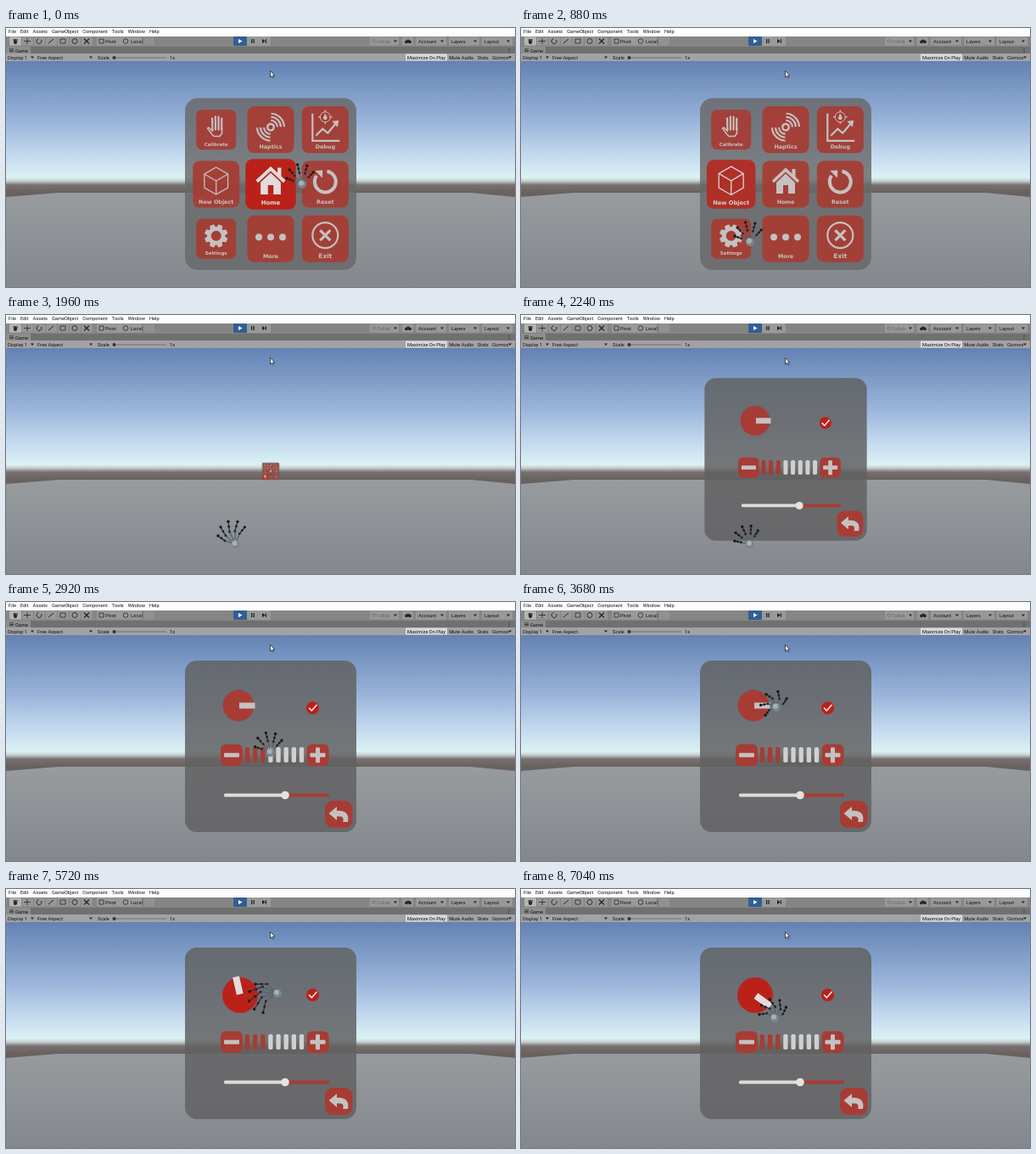
These frames come from a looping animation (600 px wide and 305 px high, 7.08 s). An HTML page with a canvas:

```html
<!DOCTYPE html>
<html lang="en">
<head>
<meta charset="utf-8">
<title>Hand menu</title>
<style>
html, body { margin: 0; width: 600px; height: 305px; overflow: hidden; }
canvas { display: block; }
</style>
</head>
<body>
<canvas id="stage" width="600" height="305"></canvas>
<script>
const c = document.getElementById('stage').getContext('2d');
const LOOP = 7080, RAD = Math.PI / 180;

// ---------- helpers ----------
const clamp = v => Math.min(1, Math.max(0, v));
const mix = (a, b, k) => a + (b - a) * k;
const ease = (t, from, to) => { const k = clamp((t - from) / (to - from)); return k * k * (3 - 2 * k); };
const mixRgb = (a, b, k) => `rgb(${a.map((v, i) => Math.round(mix(v, b[i], k)))})`;

function box(x, y, w, h, r, fill) {
  c.fillStyle = fill;
  c.beginPath();
  c.roundRect(x, y, w, h, r);
  c.fill();
}
function disc(x, y, r, fill) {
  c.fillStyle = fill;
  c.beginPath();
  c.arc(x, y, r, 0, 7);
  c.fill();
}
function trace(pts, close) {
  c.beginPath();
  for (let i = 0; i < pts.length; i += 2) c.lineTo(pts[i], pts[i + 1]);
  if (close) c.closePath();
}
function line(pts, width, color, close) {
  trace(pts, close);
  c.lineWidth = width;
  c.strokeStyle = color;
  c.stroke();
}
function poly(pts, color) {
  trace(pts, true);
  c.fillStyle = color;
  c.fill();
}
function arc(x, y, r, from, to, width, color) {
  c.beginPath();
  c.arc(x, y, r, from * RAD, to * RAD);
  c.lineWidth = width;
  c.strokeStyle = color;
  c.stroke();
}
function text(s, x, y, color = '#111', font = '5.7px Roboto, sans-serif') {
  c.font = font;
  c.fillStyle = color;
  c.fillText(s, x, y);
  return c.measureText(s).width;
}
function gradient(y0, y1, stops) {
  const g = c.createLinearGradient(0, y0, 0, y1);
  stops.forEach(([y, color]) => g.addColorStop((y - y0) / (y1 - y0), color));
  return g;
}
function zoomed(x, y, s, draw) {
  if (s <= 0) return;
  c.save();
  c.translate(x, y);
  c.scale(s, s);
  draw();
  c.restore();
}

// ---------- scene ----------
const sky = gradient(39, 194, [[39, '#6382b3'], [110, '#9ab4da'], [150, '#c3daee'],
  [176, '#dcf1f4'], [180, '#c6d0d2'], [185, '#77706e'], [194, '#68615e']]);
const ground = gradient(194, 305, [[194, '#989b9e'], [305, '#84878c']]);

function scene() {
  c.fillStyle = sky;
  c.fillRect(0, 39, 600, 155);
  c.fillStyle = '#68615e';
  c.fillRect(0, 193, 600, 10);
  poly([62, 194, 548, 194, 600, 199, 600, 305, 0, 305, 0, 199], ground);
}

// ---------- editor bars ----------
const ink = '#262626';
const caret = (x, y) => poly([x, y, x + 4, y, x + 2, y + 2.5], ink);

function toolbar() {
  box(0, 0, 600, 10, 0, '#fdfdfd');
  box(0, 10, 600, 12, 0, '#858585');
  box(0, 22, 600, 8, 0, '#707070');
  box(0, 22, 29, 8, 0, '#8d8d8d');
  box(0, 30, 600, 9, 0, '#a2a2a2');
  let x = 3;
  for (const s of ['File', 'Edit', 'Assets', 'GameObject', 'Component', 'Tools', 'Window', 'Help'])
    x += text(s, x, 6.3) + 5;

  // tool buttons
  box(4, 10.5, 98, 10, 1, '#969696');
  box(4, 10.5, 14, 10, 1, '#b4b4b4');
  for (let i = 1; i < 7; i++) box(4 + i * 14, 10.5, .6, 10, 0, '#777');
  for (let i = 0; i < 4; i++) line([9 + i * 1.4, 13, 9.6 + i, 17], 1, ink);
  disc(11, 17, 2, ink);
  line([25, 12, 25, 19], .8, ink);
  line([21, 15.5, 29, 15.5], .8, ink);
  arc(39, 15.5, 3, -30, 260, 1, ink);
  line([50, 18, 56, 13], 1, ink);
  line([64, 13, 70, 13, 70, 18, 64, 18], .8, ink, true);
  arc(81, 15.5, 3, 0, 360, .9, ink);
  line([92, 12.5, 98, 18.5], 1.3, ink);
  line([98, 12.5, 92, 18.5], 1.3, ink);
  box(107, 10.5, 53, 10, 1, '#999');
  line([110, 13, 115, 13, 115, 18, 110, 18], .8, ink, true);
  arc(141, 15.5, 2.8, 0, 360, .8, ink);
  text('Pivot', 117, 17.5);
  text('Local', 147, 17.5);
  box(163, 10.5, 12, 10, 1, '#919191');

  // play, pause, step
  box(268, 10, 44, 11, 1, '#999');
  box(268, 10, 16, 11, 1, '#315f94');
  poly([274, 13, 274, 18, 278.5, 15.5], '#fff');
  box(289, 13, 1.3, 5, 0, ink);
  box(291.5, 13, 1.3, 5, 0, ink);
  poly([302, 13, 302, 18, 306, 15.5], ink);
  box(306, 13, 1, 5, 0, ink);

  // right-hand drop-downs
  box(429, 10.5, 34, 10, 1, '#989898');
  text('Collab', 437, 17.5, '#666');
  arc(433.5, 15.5, 1.8, 0, 360, .7, '#666');
  caret(457, 14.5);
  box(467, 10.5, 13, 10, 1, '#989898');
  for (let i = -1; i < 2; i++) disc(474 + 2 * i, 15.3 + Math.abs(i), 1.9, ink);
  ['Account', 'Layers', 'Layout'].forEach((s, i) => {
    box(483 + 39 * i, 10.5, 36, 10, 1, '#989898');
    text(s, 486 + 39 * i, 17.5);
    caret(512 + 39 * i, 14.5);
  });

  // game view tab and options
  for (let i = 0; i < 3; i++) {
    box(4, 24.5 + i * 1.5, 5, .7, 0, ink);
    disc(593, 24.5 + i * 2, .6, ink);
  }
  text('Game', 11, 28.5);
  text('Display 1', 2, 36.8);
  caret(29, 33.5);
  text('Free Aspect', 37, 36.8);
  caret(98, 33.5);
  text('Scale', 108, 36.8);
  line([127, 35, 189, 35], .8, '#666');
  disc(127.5, 35, 2, '#333');
  text('1x', 193, 36.8);
  box(471, 30.5, 49, 8, 0, '#d9d9d9');
  x = 473;
  for (const s of ['Maximize On Play', 'Mute Audio', 'Stats', 'Gizmos']) x += text(s, x, 36.8) + 4.3;
  caret(592, 33.5);

  const pointer = [311.5, 50.5, 311.5, 58, 313.2, 56.4, 314.5, 59, 315.6, 58.4, 314.4, 55.9, 316.7, 55.8];
  poly(pointer, '#fff');
  line(pointer, .7, '#111', true);
}

// ---------- menu icons, drawn around the tile centre ----------
const icons = {
  Calibrate(fg) {
    c.lineCap = c.lineJoin = 'round';
    for (let i = 0; i < 4; i++) line([-5 + i * 4.2, 0, -5.5 + i * 4.4, -19 + 2.2 * Math.abs(i - 1.4)], 2.5, fg);
    line([-5, -2, -5, 2, -10, -3, -12, -2, -6, 6, -3, 9, 5, 9, 8, 5, 8, -3], 1.8, fg);
  },
  Haptics(fg, bg) {
    disc(0, -3, 5, fg);
    disc(0, -3, 2.5, bg);
    for (const r of [8, 12, 16])
      for (const a of [0, 180]) arc(0, -3, r, a + 2, a + 88, 2.1, fg), arc;
  },
  Debug(fg, bg) {
    line([-15, -19, -15, 13, 17, 13], 2.2, fg);
    line([-11, 7, -3, -1, 3, 4, 13, -8], 2.2, fg);
    poly([8, -10, 16, -11, 14.5, -3], fg);
    disc(0, -15, 7.5, bg);
    arc(0, -15, 6, 0, 360, 1, fg);
    disc(0, -14, 2.4, fg);
    disc(0, -17, 1.4, fg);
    for (let a = 0; a < 360; a += 90) arc(0, -15, 6.8, a - 5, a + 5, 3, fg);
  },
  'New Object'(fg) {
    const hex = [];
    for (let a = -90; a < 270; a += 60) hex.push(16 * Math.cos(a * RAD), 16 * Math.sin(a * RAD) - 4);
    line(hex, 1.3, fg, true);
    for (let i = 2; i < 12; i += 4) line([0, -4, hex[i], hex[i + 1]], 1.3, fg);
  },
  Home(fg, bg) {
    line([-15, -3, 0, -17, 15, -3], 3.6, fg);
    box(7.5, -18, 4, 10, 0, fg);
    poly([-11, -2, 0, -12.5, 11, -2, 11, 11, -11, 11], fg);
    box(-3, 1, 6, 10, 0, bg);
  },
  Reset(fg) {
    arc(0, -3, 12.5, -80, 215, 4, fg);
    poly([-12, -16, -3, -16.5, -3.5, -7.5], fg);
  },
  Settings(fg, bg) {
    zoomed(0, -4, 1, () => {
      c.rotate(22.5 * RAD);
      for (let i = 0; i < 8; i++) {
        poly([-4.2, -10, -3, -16, 3, -16, 4.2, -10], fg);
        c.rotate(45 * RAD);
      }
      disc(0, 0, 12.5, fg);
      disc(0, 0, 7, bg);
    });
  },
  More(fg) { [-14, 0, 14].forEach(x => disc(x, -2, 4, fg)); },
  Exit(fg) {
    arc(0, -4, 15, 0, 360, 2.2, fg);
    line([-6, -10, 6, 2], 3.2, fg);
    line([6, -10, -6, 2], 3.2, fg);
  }
};
// The waves open to the upper left and lower right.
icons.Haptics = (fg, bg) => {
  disc(0, -3, 5, fg);
  disc(0, -3, 2.5, bg);
  for (const r of [8, 12, 16])
    for (const a of [0, 180]) arc(0, -3, r, a + 2, a + 88, 2.1, fg);
};

// ---------- hand ----------
// direction, spread between fingers, length, bend of the knuckles
const poses = {
  open: [257, 28, 22, 0], press: [257, 20, 30, -14], rest: [246, 27, 21, 0],
  reach: [232, 44, 18, 14], grab: [165, -19, 32, 20], twist: [255, 31, 21, 18]
};
const path = [
  [0, 349, 184, 'open'], [700, 276, 200, 'open'], [880, 270, 252, 'open'], [1150, 340, 250, 'open'],
  [1440, 272, 262, 'open'], [1720, 271, 270, 'press'], [2240, 270, 270, 'rest'], [2860, 312, 178, 'open'],
  [3680, 301, 124, 'reach'], [4300, 306, 130, 'reach'], [5720, 320, 123, 'grab'], [7080, 299, 152, 'twist']
];

function handAt(t) {
  const i = Math.max(1, path.findIndex(p => p[0] > t));
  const [a, b] = [path[i - 1], path[i]], k = ease(t, a[0], b[0]);
  return {
    x: mix(a[1], b[1], k),
    y: mix(a[2], b[2], k),
    pose: poses[a[3]].map((v, j) => mix(v, poses[b[3]][j], k))
  };
}

function hand(t) {
  const { x, y, pose: [dir, spread, len, bend] } = handAt(t);
  const point = (angle, r) => [x + r * Math.cos(angle * RAD), y + r * Math.sin(angle * RAD)];
  c.lineCap = 'round';
  for (let i = -2; i <= 2; i++) {
    const angle = dir + spread * i, reach = len * (1.08 - .05 * i * i);
    const knuckle = point(angle + bend, reach * .58), tip = point(angle, reach);
    line([x, y, ...knuckle], 1.4, '#59656a');
    line([...knuckle, ...tip], 1.3, '#2c3437');
    disc(...knuckle, 1.4, '#22282b');
    disc((knuckle[0] + tip[0]) / 2, (knuckle[1] + tip[1]) / 2, 1.4, '#1b2022');
    disc(...tip, 1.7, '#16191b');
  }
  disc(x, y, 5, '#78868d');
  disc(x - 1, y - 1.2, 3, '#a5b1b7');
}

// ---------- panels ----------
const dimRed = [167, 60, 52], hotRed = [186, 34, 25], dimInk = [196, 193, 193], hotInk = [226, 220, 220];
const RED = `rgb(${dimRed})`, INK = `rgb(${dimInk})`;

// A tile lights up shortly after the fingertips reach it.
function heat(x, y, t) {
  const h = handAt(Math.max(0, t - 120));
  return clamp(1.9 - Math.hypot(h.x - 22 - x, h.y - 6 - y) / 18);
}

function menu(t) {
  box(-101, -101.5, 202, 202.5, 15, 'rgba(104,104,105,.82)');
  Object.keys(icons).forEach((name, i) => {
    const x = 64.3 * (i % 3 - 1), y = 64.2 * (Math.floor(i / 3) - 1);
    const hot = heat(312 + x, 184 + y, t), size = /Calibrate|Settings/.test(name) ? 47 : 55;
    const bg = mixRgb(dimRed, hotRed, hot), fg = mixRgb(dimInk, hotInk, hot);
    zoomed(x, y, mix(size, 59.5, hot) / 55, () => {
      c.globalAlpha = mix(.92, 1, hot);
      box(-27.5, -27.5, 55, 55, 8, bg);
      c.globalAlpha = 1;
      c.lineCap = 'butt';
      c.lineJoin = 'miter';
      c.save();
      if (name === 'Haptics') c.scale(-1, 1), c.translate(0, 0), c.transform(1, 0, 0, -1, 0, -6), c.scale(1, -1), c.translate(0, 6);
      icons[name](fg, bg);
      c.restore();
      c.textAlign = 'center';
      text(name, 0, 22.5, fg, `bold ${name === 'Exit' ? 7.4 : 6.4}px "DejaVu Sans", sans-serif`);
    });
  });
}

function settings(t) {
  c.translate(-312, -170);
  box(211, 69, 202, 202, 14, 'rgba(98,98,99,.85)');

  // The knob turns up to the left, then back past its start.
  const grip = ease(t, 4300, 4450);
  const turn = -103 * ease(t, 4300, 5720) + 139 * ease(t, 5800, 7040);
  zoomed(274 + 2 * grip, 122 + 3 * grip, 1 + .135 * grip, () => {
    disc(0, 0, 18.5, mixRgb(dimRed, hotRed, grip));
    c.rotate(turn * RAD);
    box(1, -3.5, 18.5, 7, 0, mixRgb(dimInk, hotInk, grip));
  });

  disc(361.5, 124.7, 7.5, '#bb2018');
  c.lineCap = c.lineJoin = 'round';
  line([357.5, 125, 360.3, 128, 366, 121.5], 1.7, '#f0e8e8');

  for (const x of [253, 354.5]) {
    box(x, 167.5, 26, 25.5, 6, RED);
    box(x + 4, 177.7, 18, 5, 1, INK);
  }
  box(365, 171.2, 5, 18, 1, INK);
  for (let i = 0; i < 8; i++) box(281.8 + i * 9.15, 171, 5.3, 18, 1.8, i < 3 ? RED : '#d0d0d2');

  box(257, 225.5, 72, 4, 1.5, '#dedbdc');
  box(329, 225.5, 52, 4, 1.5, RED);
  disc(329, 227.5, 4.8, '#e4e2e2');

  box(376, 234, 32.5, 32, 9, RED);
  c.fillStyle = INK;
  c.fill(new Path2D('M380.5 249L390 241V246C400 245 405 250 403 259H397C399 253 396 252 390 252.5V257Z'));
}

// ---------- loop ----------
function frame() {
  const t = (performance.now() - start) % LOOP;
  c.textAlign = 'left';
  scene();
  zoomed(312, 184, 1 + .225 * ease(t, 1500, 1720) - 1.225 * ease(t, 1780, 2000), () => menu(t));
  zoomed(312, 170, ease(t, 2000, 2280), () => settings(t));
  hand(t);
  c.lineCap = 'butt';
  c.lineJoin = 'miter';
  toolbar();
  requestAnimationFrame(frame);
}
const start = performance.now();
frame();
</script>
</body>
</html>
```
